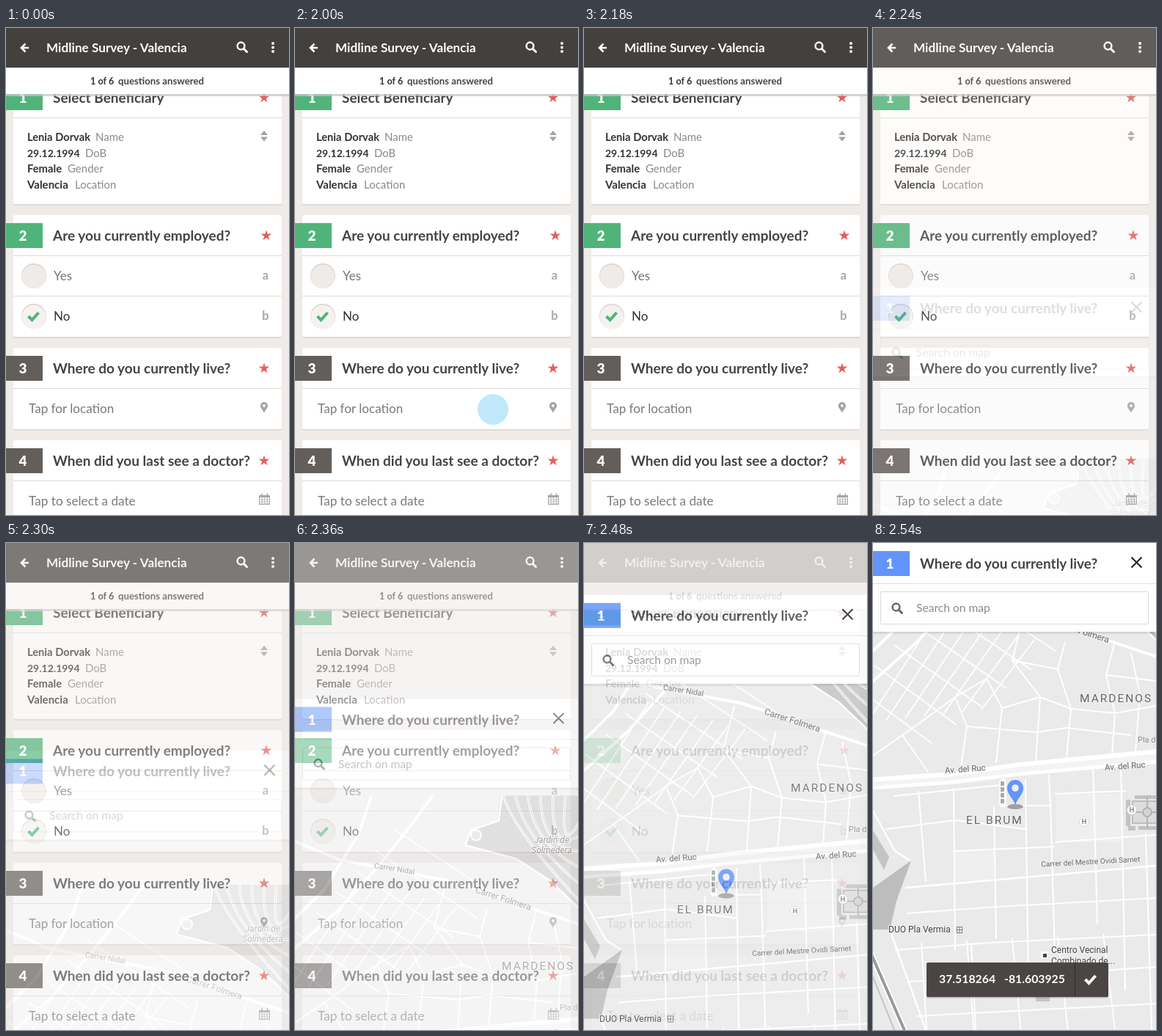
An HTML page for the animation above (6540 ms loop, 386x664 px).

```html
<!DOCTYPE html>
<html lang="en">
<head>
<meta charset="utf-8">
<title>Survey</title>
<style>
html, body { margin: 0; width: 100%; height: 100%; overflow: hidden; background: #efebe8; }
svg { display: block; width: 386px; height: 664px; }
text { font-family: Lato, "Open Sans", sans-serif; white-space: pre; }
.b { font-weight: 700; }
.k { font-weight: 900; }
.m { text-anchor: middle; }
.map text { font-family: Roboto, Arial, sans-serif; paint-order: stroke; stroke: #f1f1f1; stroke-width: 2px; }
.map .wide { letter-spacing: 2px; }
.map .i { font-style: italic; }
.road { fill: none; stroke: #fff; stroke-linejoin: round; }
.line { fill: none; stroke-linecap: round; stroke-linejoin: round; }
</style>
</head>
<body>
<svg id="stage" viewBox="0 0 386 664"></svg>
<script>
const LOOP = 6540, TAP = 2000, STEP = 60;
const GREEN = '#50b47a', BROWN = '#645e5b', BLUE = '#6394fb', INK = '#464342';

const text = (x, y, size, fill, str, cls = '', angle = 0) =>
  `<text x="${x}" y="${y}" font-size="${size}" fill="${fill}" class="${cls}"` +
  (angle ? ` transform="rotate(${angle} ${x} ${y})"` : '') + `>${str}</text>`;
const rect = (x, y, w, h, fill, extra = '') =>
  `<rect x="${x}" y="${y}" width="${w}" height="${h}" fill="${fill}" ${extra}/>`;
const circle = (x, y, r, fill, extra = '') =>
  `<circle cx="${x}" cy="${y}" r="${r}" fill="${fill}" ${extra}/>`;
const shape = (d, fill) => `<path d="${d}" fill="${fill}"/>`;
const line = (d, color, w) => `<path class="line" d="${d}" stroke="${color}" stroke-width="${w}"/>`;
const road = (w, ...ds) => `<path class="road" d="${ds.join('')}" stroke-width="${w}"/>`;

function star(x, y) {
  let d = '';
  for (let i = 0; i < 10; i++) {
    const r = i % 2 ? 2.9 : 7.8, a = (i / 5 - 0.5) * Math.PI;
    d += `${i ? 'L' : 'M'}${(x + r * Math.cos(a)).toFixed(1)} ${(y + r * Math.sin(a)).toFixed(1)}`;
  }
  return shape(d + 'Z', '#e2605b');
}

const glass = (x, y, color) =>
  circle(x, y, 4.9, 'none', `stroke="${color}" stroke-width="2.5"`) +
  line(`M${x + 4} ${y + 4}l4 4`, color, 3);

const check = (x, y, color) =>
  `<path d="M${x - 7} ${y}l5 5l9-10" fill="none" stroke="${color}" stroke-width="4"/>`;

const badge = (y, n, color) =>
  rect(0, y, 50, 34, color) + text(23, y + 24, 19, '#fff', n, 'k m');

const card = (y, h) => rect(10, y, 366, h + 2, '#e0dbd8', 'rx="2"') + rect(10, y, 366, h, '#fff', 'rx="2"');
const rule = y => rect(10, y, 366, 1, '#dedddc');

const question = (y, h, n, color, title, sx) =>
  card(y, h) + rule(y + 55) + badge(y + 11, n, color) +
  text(64, y + 35, 19, INK, title, 'b') + star(sx, y + 28);

const option = (y, fill) =>
  circle(38, y, 17, '#d9d2ce') + circle(38, y + .8, 16.3, fill);

function form() {
  const info = [['Lenia Dorvak', 'Name', 122, 14.7], ['29.12.1994', 'DoB', 108, 14],
    ['Female', 'Gender', 84, 14.8], ['Valencia', 'Location', 94, 15]];
  let calendar = rect(345.5, 637.5, 14, 12, 'none', 'stroke="#a9a6a4"') + rect(345, 637, 15, 3, '#a9a6a4');
  for (let i = 1; i < 4; i++)
    calendar += rect(345 + i * 3.6, 640, 1, 9, '#b4b1af') + rect(346, 639.5 + i * 3, 13, .8, '#b4b1af');
  return rect(0, 0, 386, 664, '#efebe8') +
    question(67, 173, 1, GREEN, 'Select Beneficiary', 352) +
    info.map(([value, label, x, size], i) => {
      const y = Math.round(154 + i * 21.7);
      return text(29, y, size, '#333', value, 'b') + text(x, y, 15, '#8b8988', label);
    }).join('') +
    shape('M347 146l5-6l5 6zM347 148.5h10l-5 6z', '#a5a2a0') +

    question(255, 166, 2, GREEN, 'Are you currently employed?', 355) +
    option(338, '#efebe8') + text(65, 344, 17, '#777573', 'Yes') + text(354, 343, 16.5, '#aaa7a5', 'a', 'b m') +
    rule(365) + option(393, '#f4f2f0') + check(37.5, 393, GREEN) +
    text(65, 399, 17, '#333', 'No') + text(354, 398, 16.5, '#aaa7a5', 'b', 'b m') +

    question(436, 111, 3, BROWN, 'Where do you currently live?', 352) +
    text(31, 525, 17.1, '#7c7a78', 'Tap for location') +
    shape('M352 525c-1-4-5-6-5-10a5 5 0 0 1 10 0c0 4-4 6-5 10z', '#a5a2a0') + circle(352, 515, 2, '#fff') +

    question(562, 130, 4, BROWN, 'When did you last see a doctor?', 352) +
    text(31, 651, 17.2, '#7c7a78', 'Tap to select a date') + calendar +
    line('M349 635v3M356.500 635v3', '#a9a6a4', 1.6) +

    rect(0, 90, 386, 3, '#c9c5c2', 'opacity=".75"') + rect(0, 54, 386, 36, '#fff') +
    text(115, 77, 12.7, '#333', '1 of 6', 'b') + text(153, 77, 13.2, '#444', 'questions answered', 'b') +
    rect(0, 0, 386, 54, '#43403e') +
    `<path d="M31 27H22M26.500 21.500L21 27L26.500 32.500" fill="none" stroke="#fff" stroke-width="2.6"/>` +
    text(55, 33, 17.2, '#fff', 'Midline Survey - Valencia', 'b') + glass(320.5, 24.5, '#fff') +
    [21, 26.5, 32].map(y => rect(362.3, y - 1.8, 3.6, 3.6, '#fff', 'rx="1"')).join('');
}

function park() {
  const paths = [];
  for (let i = 0; i < 6; i++)
    paths.push(`M${284 + i * 17} -20Q${300 + i * 12} ${30 + i * 8} ${392} ${128 - i * 24}`);
  return shape('M280-20H386V134L346 96L300 66L234 48L240 28L276 16Z', '#c3c3c3') +
    road(3.4, ...paths) + line(paths.join(''), '#adadad', 1) +
    road(2.5, 'M232 48L240 27L278 14L282-20', 'M234 48L302 66L348 96L390 136') +
    circle(247, 34, 7, '#d8d8d8', 'stroke="#fff" stroke-width="2"');
}

function streets() {
  const slant = [], cross = [], south = [];
  for (let i = 0; i < 7; i++) {
    slant.push(`M${-25 + i * 27} ${195 - i * 28}l${105 + i * 7} ${78 + i * 3}`);
    cross.push(`M${-8 + i * 26} ${245 - i * 3}L${88 + i * 22} ${96 + i * 6}`);
  }
  for (let i = 0; i < 5; i++)
    south.push(`M${66 + i * 62} ${545 - i * 3}l${8 + i * 2} 130`);
  return road(1.8, ...slant, ...cross, ...south) +
    road(2,
      'M0 290L60 248L112 210L155 185', 'M40 262L75 312', 'M112 210L128 250L120 305', 'M155 185L176 225L168 300',
      'M176 225L228 210L270 226', 'M205 100L190 160L228 210L222 298', 'M190 160L252 172L262 135',
      'M252 172L270 226L264 294', 'M270 226L330 232L386 222', 'M330 134L318 180L330 232L326 288',
      'M318 180L386 188', 'M128 250L222 258L264 252L352 262', 'M352 150L364 205L358 286') +
    road(2,
      'M28 345L175 330L178 358L242 358L240 316', 'M18 390L112 378L208 390', 'M62 338L72 462', 'M110 334L112 555',
      'M165 360L168 540', 'M208 322L212 605', 'M242 358L248 560', 'M248 342L345 338', 'M248 408L386 398',
      'M300 300L306 520', 'M338 300L344 610', 'M112 420L248 414', 'M46 505L168 496L386 484') +
    road(2, 'M30 555L160 545L386 534', 'M48 598L210 590L386 578', 'M60 645L386 628', 'M372 396L380 664', 'M134 545L140 664') +
    road(2.4, 'M44 470L160 460L386 440', 'M24 530L72 664', 'M0 365L30 420L52 434') +
    road(4, 'M-5 40L60 67L140 83L215 97L270 115L330 136L390 156',
      'M-5 193L60 135L112 78L160 18L188-20', 'M-5 152L40 108L88 30L104-20');
}

const sign = (x, y) => circle(x, y, 6.5, '#fff', 'stroke="#ccc" stroke-width=".7"') +
  text(x, y + 3.3, 9, '#555', 'H', 'm');

const hospital = () =>
  shape('M357 344H386V349H357ZM345 350H351V386H345ZM348 386H358V392H348ZM362 386H386V391H362Z', '#c2c2c2') +
  rect(354, 352, 40, 30, '#dcdcdc', 'stroke="#b0b0b0" stroke-width="1.5"') +
  line('M351 367H386M374 347V389', '#b5b5b5', 2) +
  circle(374, 367, 6, '#d2d2d2', 'stroke="#aaa" stroke-width="1.5"') + sign(353, 364);

function map() {
  const grey = '#666';
  return rect(0, -20, 386, 700, '#eaeaea') +
    shape('M250 342H340V408H250ZM112 420H165V460H112Z', '#efefef') +
    park() + streets() +
    shape('M0 470L52 433L32 488L23 527H0Z', '#bdbdbd') + shape('M0 392L22 428L15 446L0 418Z', '#c4c4c4') +
    line('M-6 552L48 676', '#fff', 8) + line('M-6 552L48 676', '#999', 4) + line('M-8 572L34 676', '#c4c4c4', 2) +
    line('M-4 328L110 320L200 308L390 290', '#f3f3f3', 17) +
    road(6, 'M-5 323L110 315L200 302L390 284') + road(5, 'M-5 334L110 326L200 315L390 298') +
    line('M177 326v30', '#fff', 9) +
    [0, 1, 2, 3].map(i => rect(174, 325 + i * 8, 5, 6, '#aaa')).join('') +
    hospital() + sign(288, 380) + rect(222, 613, 19, 12, '#c9c3c3') +

    text(135, 83, 10.5, grey, 'Carrer Nidal', 'm', 9) + text(283, 124, 12, grey, 'Carrer Folmera', 'm', 18) +
    text(350, 44, 12, '#444', 'Jardín de', 'm i') + text(350, 58, 12, '#444', 'Solmedera', 'm i') +
    text(282, 217, 15.5, grey, 'MARDENOS', 'wide') + text(127, 383, 15.5, grey, 'EL BRUM', 'wide') +
    text(361, 272, 11, '#888', 'Pla de') +
    text(126, 312, 11.5, grey, 'Av. del Ruc', 'm', -4) + text(344, 308, 11.5, grey, 'Av. del Ruc', 'm', -4) +
    text(297, 438, 10.2, grey, 'Carrer del Mestre Ovidi Sarnet', 'm', -3) +
    text(21, 531, 12, '#444', 'DUO Pla Vermia') +
    rect(114.5, 523.5, 7, 8, '#fff', 'stroke="#777"') + line('M118 524v7M115 527.500h6', '#777', 1) +
    rect(229, 557, 10, 10, '#fff', 'rx="2"') + rect(232, 560, 5, 5, '#444') +
    text(243, 559, 12, '#444', 'Centro Vecinal') + text(243, 574, 12, '#444', 'Combinado de...') +

    `<ellipse cx="194" cy="359.500" rx="11" ry="3.500" fill="#a0a0a0"/>` +
    shape('M194 358C192 348 183 344 183 334a11 11 0 0 1 22 0C205 344 196 348 194 358Z', BLUE) +
    circle(194, 334, 4.8, '#f0f0f0');
}

const position = () =>
  rect(73, 573, 248, 48, '#000', 'rx="2" opacity=".15"') + rect(73, 572, 248, 47, '#4b4645', 'rx="2"') +
  rect(275, 572, 1, 47, '#2f2b2a') + text(90, 600, 15.8, '#fff', '37.518264', 'b') +
  text(179, 600, 15.8, '#fff', '-81.603925', 'b') + check(296.5, 595, '#fff');

const panel = () =>
  rect(0, 121, 386, 2, '#000', 'opacity=".07"') + rect(0, 121, 386, 4, '#000', 'opacity=".04"') +
  rect(0, 0, 386, 121, '#fff') + badge(11, 1, BLUE) +
  text(64, 35, 19, INK, 'Where do you currently live?', 'b') +
  `<path d="M352.500 19.500l14 14m0-14l-14 14" stroke="#222" stroke-width="2.1"/>` + rect(0, 55, 386, 1, '#dedede') +
  rect(10.5, 66.5, 365, 44, '#fff', 'stroke="#d9d9d9" rx="1"') + glass(31.5, 87.5, '#666') +
  text(59, 94, 15.6, '#8a8a8a', 'Search on map');

const $ = id => document.getElementById(id);
$('stage').innerHTML = form() + circle(270, 520, 21, '#bfe9fb', 'id="tap"') +
  `<g id="next">${rect(0, 0, 386, 664, '#efebe8')}<g id="low"><g class="map">${map()}</g>${position()}</g>` +
  `<g id="panel">${panel()}</g></g>`;

function draw(now) {
  // The transition advances in held 60 ms steps: tap fades, then panel and map rise at different speeds.
  const step = Math.floor((now % LOOP - TAP) / STEP);
  const p = Math.min(1, Math.max(0, (step - 3) / 6));
  $('tap').setAttribute('opacity', step < 0 ? 0 : Math.max(0, 1 - step / 3));
  $('next').setAttribute('opacity', p);
  $('low').setAttribute('transform', `translate(0 ${729 * (1 - p)})`);
  $('panel').setAttribute('transform', `translate(0 ${425 * (1 - p)})`);
  requestAnimationFrame(draw);
}
draw(performance.now());
</script>
</body>
</html>
```
